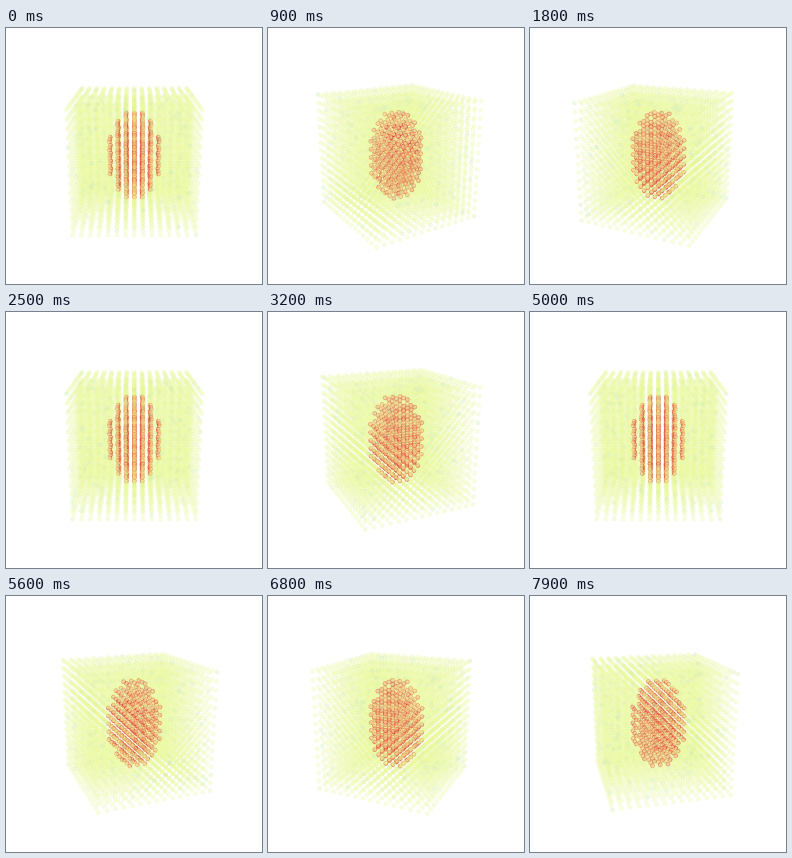
Animation of 256x256 px, one loop 8000 ms. Source, as a matplotlib script:

```python
import numpy as np
import matplotlib.pyplot as plt
from matplotlib.animation import FuncAnimation

SIZE, DPI = 256, 64
FRAMES, INTERVAL = 80, 100
STEP = np.radians(3.6)
TILT = np.radians(18)
CAMERA, ZOOM = 7.5, 424
CENTER = 128.3, 127.5
N = 15

rng = np.random.default_rng(4)

# Cubic lattice with an ellipsoidal core
cells = np.arange(N) - N // 2
x, y, z = (a.ravel() for a in np.meshgrid(cells, cells, cells, indexing="ij"))
core = (x**2 + y**2) / 3.45**2 + z**2 / 5.5**2 <= 1
x, y, z = x / 7, y / 7, z / 7 * 1.03


def blend(a, b, t):
    return np.array(a) + (np.array(b) - np.array(a)) * t[:, None]


def rgba(rgb, alpha):
    return np.column_stack([rgb / 255, alpha])


noise = rng.random(x.size)
shell = blend((235, 250, 146), (190, 232, 165), noise**14)
warm = blend((246, 150, 100), (252, 190, 130), noise)
rim = blend((208, 30, 34), (224, 66, 48), noise)
face = rgba(np.where(core[:, None], warm, shell), np.where(core, 0.6, 0.27))
edge = rgba(np.where(core[:, None], rim, shell), np.where(core, 0.62, 0.22))


def project(angle):
    """Return screen positions and distances from the camera."""
    near = x * np.cos(angle) - y * np.sin(angle)
    side = y * np.cos(angle) + x * np.sin(angle)
    up = z * np.cos(TILT) - near * np.sin(TILT)
    dist = CAMERA - near * np.cos(TILT) - z * np.sin(TILT)
    scale = ZOOM / dist
    pos = np.column_stack([CENTER[0] + side * scale, CENTER[1] - up * scale])
    return pos, dist


fig = plt.figure(figsize=(SIZE / DPI, SIZE / DPI), dpi=DPI, facecolor="white")
ax = fig.add_axes([0, 0, 1, 1])
ax.set(xlim=(0, SIZE), ylim=(SIZE, 0))
ax.axis("off")
dots = ax.scatter(x, y, s=19, linewidths=0.8)


def update(i):
    pos, dist = project(i * STEP)
    order = np.argsort(-dist, kind="stable")
    dots.set_offsets(pos[order])
    dots.set_facecolors(face[order])
    dots.set_edgecolors(edge[order])
    return (dots,)


anim = FuncAnimation(fig, update, frames=FRAMES, interval=INTERVAL,
                     repeat=True, repeat_delay=0)
plt.show()
```
